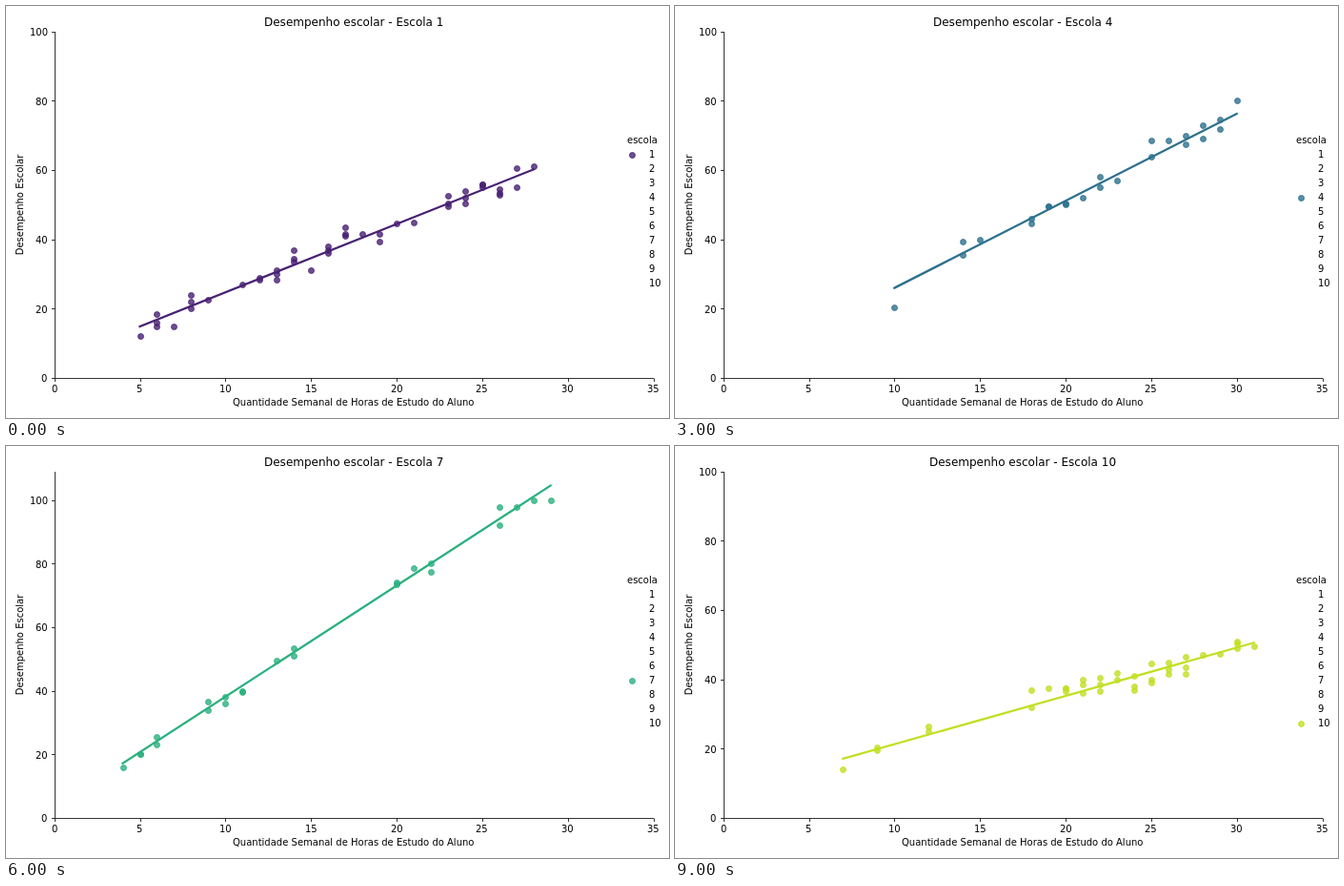
Recreate the animation shown at these times as an HTML page. Size 696 by 432 pixels, loop 10000 ms.

```html
<!DOCTYPE html>
<html lang="pt">
<head>
<meta charset="utf-8">
<title>Desempenho escolar</title>
<style>
  html, body { margin: 0; width: 100%; height: 100%; overflow: hidden; background: #fff; }
  svg { display: block; width: 696px; height: 432px; }
  text { font: 10px "DejaVu Sans", sans-serif; fill: #000; }
  .title { font-size: 12px; }
  .axis { stroke: #000; stroke-width: .8; fill: none; }
  .dot { fill-opacity: .8; stroke-opacity: .8; stroke-width: 1; }
  .fit { stroke-width: 2.25; stroke-linecap: square; }
</style>
</head>
<body>
<svg id="chart" viewBox="0 0 696 432"></svg>
<script>
const STEP = 1000;
const PLOT = { left: 50.7, right: 679.5, base: 390.05, height: 363.2 };
const CENTER = (PLOT.left + PLOT.right) / 2;
const MIDDLE = .5, END = 1;
const chart = document.getElementById('chart');

// hours: spans of weekly study hours; fit: grade at the first and last hour;
// spread: largest distance from the line; crowd: most pupils per hour
const schools = [
  { color: '#482173', hours: [[5, 9], [11, 21], [23, 28]], fit: [14.9, 60.2], spread: 5, crowd: 3 },
  { color: '#433e85', hours: [[5, 28]], fit: [13.5, 52], spread: 5, crowd: 2 },
  { color: '#38588c', hours: [[5, 7], [9, 20], [25, 27]], fit: [40.8, 105.3], spread: 7, crowd: 4, top: 108.68 },
  { color: '#2d708e', hours: [[10, 10], [14, 15], [18, 23], [25, 30]], fit: [26, 76.3], spread: 6, crowd: 2 },
  { color: '#25858e', hours: [[11, 28]], fit: [8.5, 34], spread: 4, crowd: 2 },
  { color: '#1e9b8a', hours: [[5, 5], [7, 7], [9, 10], [12, 23], [26, 26]], fit: [16.8, 47.3], spread: 5, crowd: 3 },
  { color: '#2ab07f', hours: [[4, 6], [9, 11], [13, 14], [20, 22], [26, 29]], fit: [17.2, 104.6], spread: 5, crowd: 2, top: 109 },
  { color: '#52c569', hours: [[15, 31]], fit: [27, 56], spread: 5, crowd: 2 },
  { color: '#86d549', hours: [[14, 16], [18, 30]], fit: [13.5, 22.4], spread: 5, crowd: 4 },
  { color: '#c2df23', hours: [[7, 7], [9, 9], [12, 12], [18, 31]], fit: [17.1, 50.6], spread: 5, crowd: 3 }
];

function randomizer(seed) {
  return () => {
    seed = (seed * 16807) % 2147483647;
    return seed / 2147483647;
  };
}

function add(parent, tag, attrs, text) {
  const el = document.createElementNS(chart.namespaceURI, tag);
  for (const key in attrs) el.setAttribute(key, attrs[key]);
  if (text !== undefined) el.textContent = text;
  return parent.appendChild(el);
}

// Text starts on whole pixels
function label(parent, x, y, text, align = 0, cls = '') {
  const el = add(parent, 'text', { y: Math.round(y), class: cls }, text);
  el.setAttribute('x', Math.round(x - align * el.getComputedTextLength()));
}

const snap = v => Math.round(v) + .5;
const toX = x => PLOT.left + x * (PLOT.right - PLOT.left) / 35;
const toY = (y, top) => PLOT.base - y * PLOT.height / top;

function dot(parent, x, y, color) {
  add(parent, 'circle', { cx: snap(x), cy: snap(y), r: 3, class: 'dot', fill: color, stroke: color });
}

function drawFrame() {
  add(chart, 'rect', { width: 696, height: 432, fill: '#fff' });
  add(chart, 'path', { d: 'M51.5 27V390.5H680', class: 'axis' });
  for (let x = 0; x <= 35; x += 5) {
    add(chart, 'path', { d: `M${snap(toX(x))} 390.5v3.5`, class: 'axis' });
    label(chart, toX(x), 405, x, MIDDLE);
  }
  label(chart, CENTER, 419, 'Quantidade Semanal de Horas de Estudo do Aluno', MIDDLE);
  add(chart, 'text', { transform: 'translate(18 208.5) rotate(-90)', 'text-anchor': 'middle' }, 'Desempenho Escolar');
  label(chart, 652, 144, 'escola');
  schools.forEach((_, i) => label(chart, 675, 159 + 15 * i, i + 1));
}

function drawPupils(group, { color, hours, fit, spread, crowd, top = 100 }, seed) {
  const random = randomizer(seed);
  const first = hours[0][0], last = hours[hours.length - 1][1];
  const slope = (fit[1] - fit[0]) / (last - first);
  for (const [from, to] of hours)
    for (let h = from; h <= to; h++) {
      const pupils = h === first || h === last ? 1 : 1 + Math.floor(random() * crowd);
      for (let n = 0; n < pupils; n++) {
        const noise = (random() + random() - 1) * spread;
        const grade = Math.round((fit[0] + slope * (h - first) + noise) * 2) / 2;
        dot(group, toX(h), toY(Math.min(grade, 100), top), color);
      }
    }
  add(group, 'line', {
    x1: toX(first), y1: toY(fit[0], top), x2: toX(last), y2: toY(fit[1], top),
    class: 'fit', stroke: color
  });
}

function drawSchool(school, i) {
  const group = add(chart, 'g', {});
  label(group, CENTER, 21, `Desempenho escolar - Escola ${i + 1}`, MIDDLE, 'title');
  for (let grade = 0; grade <= 100; grade += 20) {
    const y = toY(grade, school.top || 100);
    add(group, 'path', { d: `M51.5 ${snap(y)}h-3.5`, class: 'axis' });
    label(group, PLOT.left - 7, y + 4.1, grade, END);
  }
  drawPupils(group, school, 1000 * (i + 1) + 7);
  dot(group, 657, 156 + 15 * i, school.color);

  const count = schools.length;
  group.animate([
    { opacity: i ? 0 : 1, offset: 0, easing: 'step-end' },
    { opacity: 1, offset: i / count, easing: 'step-end' },
    { opacity: 0, offset: (i + 1) / count, easing: 'step-end' },
    { opacity: 0, offset: 1 }
  ], { duration: STEP * count, iterations: Infinity });
}

drawFrame();
schools.forEach(drawSchool);
</script>
</body>
</html>
```
